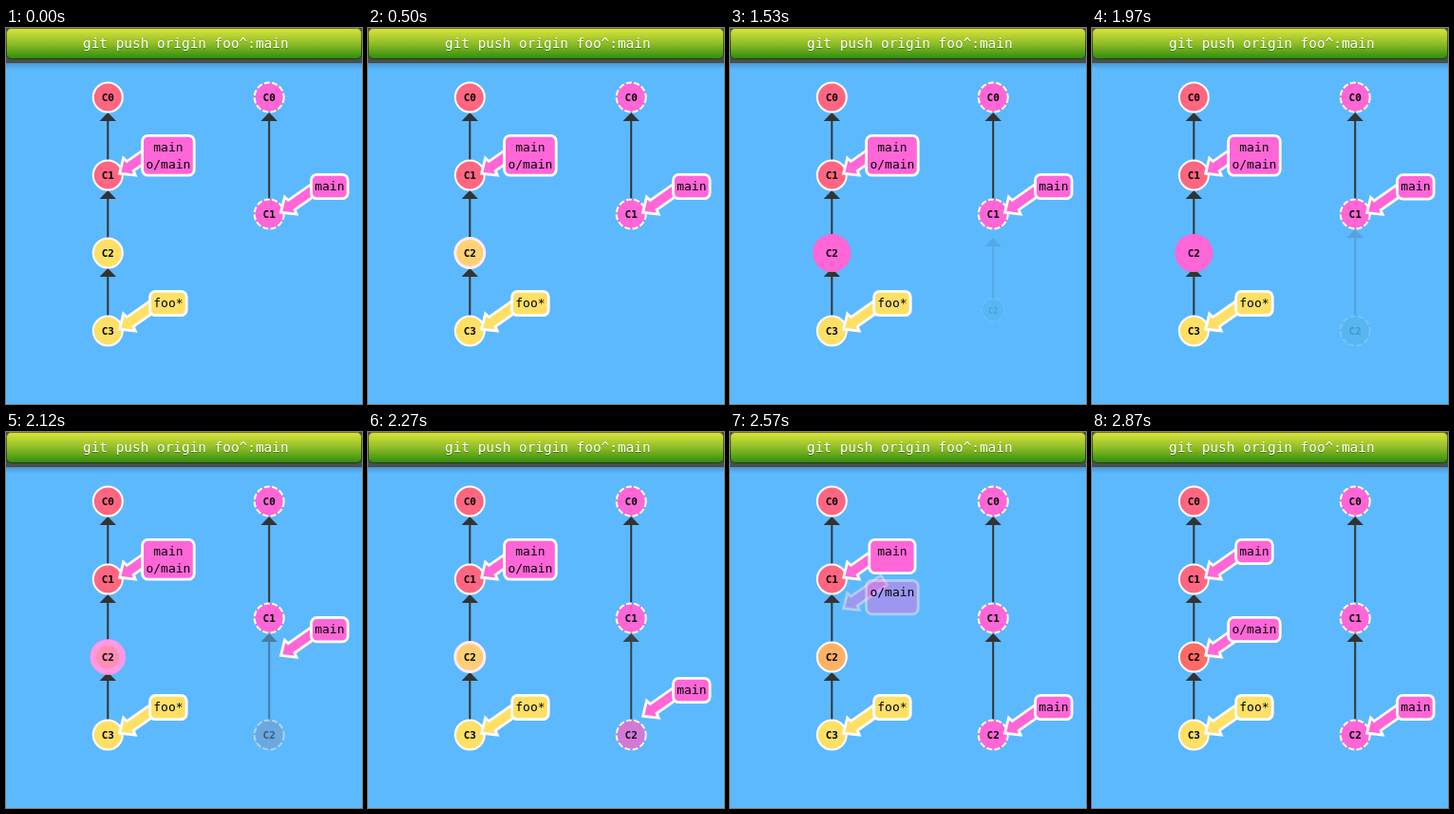
Animation, 375 px wide and 396 px high, one loop 7.69 s. Source, as an HTML page with a canvas:

```html
<!DOCTYPE html>
<html lang="en">
<head>
<meta charset="utf-8">
<title>git push</title>
<style>
html, body { margin: 0; width: 100%; height: 100%; overflow: hidden; background: #5cb9fe; }
canvas { display: block; }
</style>
</head>
<body>
<canvas id="stage" width="375" height="396"></canvas>
<script>
const ctx = document.getElementById('stage').getContext('2d');
const LOOP = 7690;
const TICKS = [0, 500, 650, 790, 940, 1380, 1530, 1680, 1820, 1970, 2120, 2270, 2420, 2570, 2720, 2870];
const MONO = '"DejaVu Sans Mono", monospace';
const PINK = [255, 102, 215], YELLOW = [255, 224, 102], ROSE = [255, 102, 130];
const RED = [255, 107, 102], TEAL = [60, 170, 170], WHITE = [255, 255, 255];
const LEFT = 107.3, RIGHT = 277.2, RADIUS = 15.5;

const lerp = (a, b, p) => a + (b - a) * p;
const mix = (a, b, p) => a.map((v, i) => lerp(v, b[i], p));
const css = c => `rgb(${c.map(Math.round).join(',')})`;

function ease(t, start, duration) {
  const x = Math.min(1, Math.max(0, (t - start) / duration));
  return (1 - Math.cos(Math.PI * x)) / 2;
}

// Piecewise linear value through [time, value] stops.
function along(t, stops) {
  if (t <= stops[0][0]) return stops[0][1];
  for (let i = 1; i < stops.length; i++) {
    const [t0, v0] = stops[i - 1], [t1, v1] = stops[i];
    if (t <= t1) return lerp(v0, v1, (t - t0) / (t1 - t0));
  }
  return stops[stops.length - 1][1];
}

function write(text, x, y, font, color = '#000') {
  ctx.font = `${font} ${MONO}`;
  ctx.textAlign = 'center';
  ctx.fillStyle = color;
  ctx.fillText(text, x, y);
}

function polygon(points) {
  ctx.beginPath();
  points.forEach(([x, y]) => ctx.lineTo(x, y));
  ctx.closePath();
}

function verticalGradient(top, bottom, ...colors) {
  const g = ctx.createLinearGradient(0, top, 0, bottom);
  colors.forEach((c, i) => g.addColorStop(i / (colors.length - 1), c));
  return g;
}

function edge(x, tip, end, alpha = 1) {
  ctx.globalAlpha = alpha;
  ctx.fillStyle = '#333';
  ctx.fillRect(x - 1, tip + 9, 2, end - tip - 9);
  polygon([[x, tip], [x + 8.7, tip + 9], [x - 8.7, tip + 9]]);
  ctx.fill();
  ctx.globalAlpha = 1;
}

function commit(text, x, y, fill, { dashed, stroke = WHITE, width = 2, r = RADIUS, alpha = 1 } = {}) {
  ctx.globalAlpha = alpha;
  ctx.beginPath();
  ctx.arc(x, y, r, 0, 2 * Math.PI);
  ctx.fillStyle = css(fill);
  ctx.fill();
  ctx.strokeStyle = css(stroke);
  ctx.lineWidth = width;
  ctx.setLineDash(dashed ? [6, 2.4] : []);
  ctx.stroke();
  ctx.setLineDash([]);
  write(text, x, y + 4, `bold ${11 * r / RADIUS}px`);
  ctx.globalAlpha = 1;
}

function paint(fill) {
  ctx.fillStyle = css(fill);
  ctx.fill();
  ctx.strokeStyle = '#fff';
  ctx.lineWidth = 2.8;
  ctx.stroke();
}

// Branch tag: an arrow aimed at a commit, with a rounded box over its tail.
function tag(lines, x, y, fill, { textY = y - 29, halfW, extraH = 0, alpha = 1 } = {}) {
  const angle = -35 * Math.PI / 180, cx = x + 63.6;
  ctx.globalAlpha = alpha;
  ctx.save();
  ctx.translate(x + 12.4, y - 1.8);
  ctx.rotate(angle);
  polygon([[0, 0], [12.5, -11], [13.5, -6], [52, -6], [52, 6], [13.5, 6], [12.5, 11]]);
  paint(fill);
  ctx.restore();
  ctx.beginPath();
  ctx.roundRect(cx - halfW, textY - 12.7, 2 * halfW, 25.4 + extraH, 6);
  paint(fill);
  ctx.globalAlpha = 1;
  lines.forEach((line, i) => write(line, cx, textY + 4 + 17.5 * i, '13px'));
}

function header() {
  ctx.fillStyle = '#4b4e50';
  ctx.fillRect(0, 0, 375, 37);
  ctx.fillStyle = verticalGradient(37, 44, 'rgba(0,0,0,.18)', 'rgba(0,0,0,0)');
  ctx.fillRect(0, 37, 375, 7);
  ctx.beginPath();
  ctx.roundRect(0.5, 0.5, 374, 32, 5);
  ctx.fillStyle = verticalGradient(0, 33, '#dce53c', '#8fbd27', '#2b8a0c');
  ctx.fill();
  ctx.strokeStyle = verticalGradient(0, 33, '#6d7426', '#1c3a0c');
  ctx.lineWidth = 1;
  ctx.stroke();
  ctx.shadowColor = 'rgba(0,0,0,.3)';
  ctx.shadowOffsetY = 1;
  write('git push origin foo^:main', 189.3, 21, '14.4px', '#fff');
  ctx.shadowColor = 'transparent';
}

function draw(t) {
  const push = ease(t, 1955, 420);
  const glow = ease(t, 380, 530) - push;
  const split = ease(t, 2383, 430);

  ctx.fillStyle = '#5cb9fe';
  ctx.fillRect(0, 0, 375, 396);
  header();

  edge(LEFT, 89, 140);
  edge(LEFT, 171, 222);
  edge(LEFT, 253, 304);
  edge(RIGHT, 89, 181);

  if (t >= 1380) {
    const y = along(t, [[1380, 261.5], [1530, 297], [1680, 300], [1820, 312], [1970, 319]]);
    const r = along(t, [[1380, 7.5], [1530, 12], [1680, 13], [1820, 14], [1970, RADIUS]]);
    const faint = along(t, [[1380, 0.05], [1530, 0.12], [1970, 0.17]]);
    const alpha = lerp(faint, 1, push);
    if (t >= 1530) edge(RIGHT, along(t, [[1530, 221], [1970, 212]]), y - r, alpha);
    commit('C2', RIGHT, y, mix(TEAL, PINK, push), { dashed: true, r, alpha, width: 2 * r / RADIUS });
  }

  commit('C0', LEFT, 73, ROSE);
  commit('C1', LEFT, 155, ROSE);
  commit('C2', LEFT, 237, mix(mix(YELLOW, RED, split), PINK, glow),
    { stroke: mix(WHITE, PINK, glow), width: lerp(2, 9, glow) });
  commit('C3', LEFT, 319, YELLOW);
  commit('C0', RIGHT, 73, PINK, { dashed: true });
  commit('C1', RIGHT, 196, PINK, { dashed: true });

  tag(['foo*'], LEFT, 319, YELLOW, { halfW: 19.3 });
  tag(['main'], RIGHT, lerp(196, 319, push), PINK, { halfW: 19.3 });
  tag(split ? ['main'] : ['main', 'o/main'], LEFT, 155, PINK,
    { halfW: lerp(27.3, 19.3, split), extraH: lerp(16.5, 0, split) });
  if (split) {
    tag(['o/main'], LEFT, lerp(155, 237, split), PINK,
      { textY: lerp(143.5, 208, split), halfW: 27.3, extraH: lerp(16.5, 0, split), alpha: split });
  }
}

function frame() {
  const now = performance.now() % LOOP;
  draw(TICKS.filter(tick => tick <= now).pop());
  requestAnimationFrame(frame);
}
frame();
</script>
</body>
</html>
```
